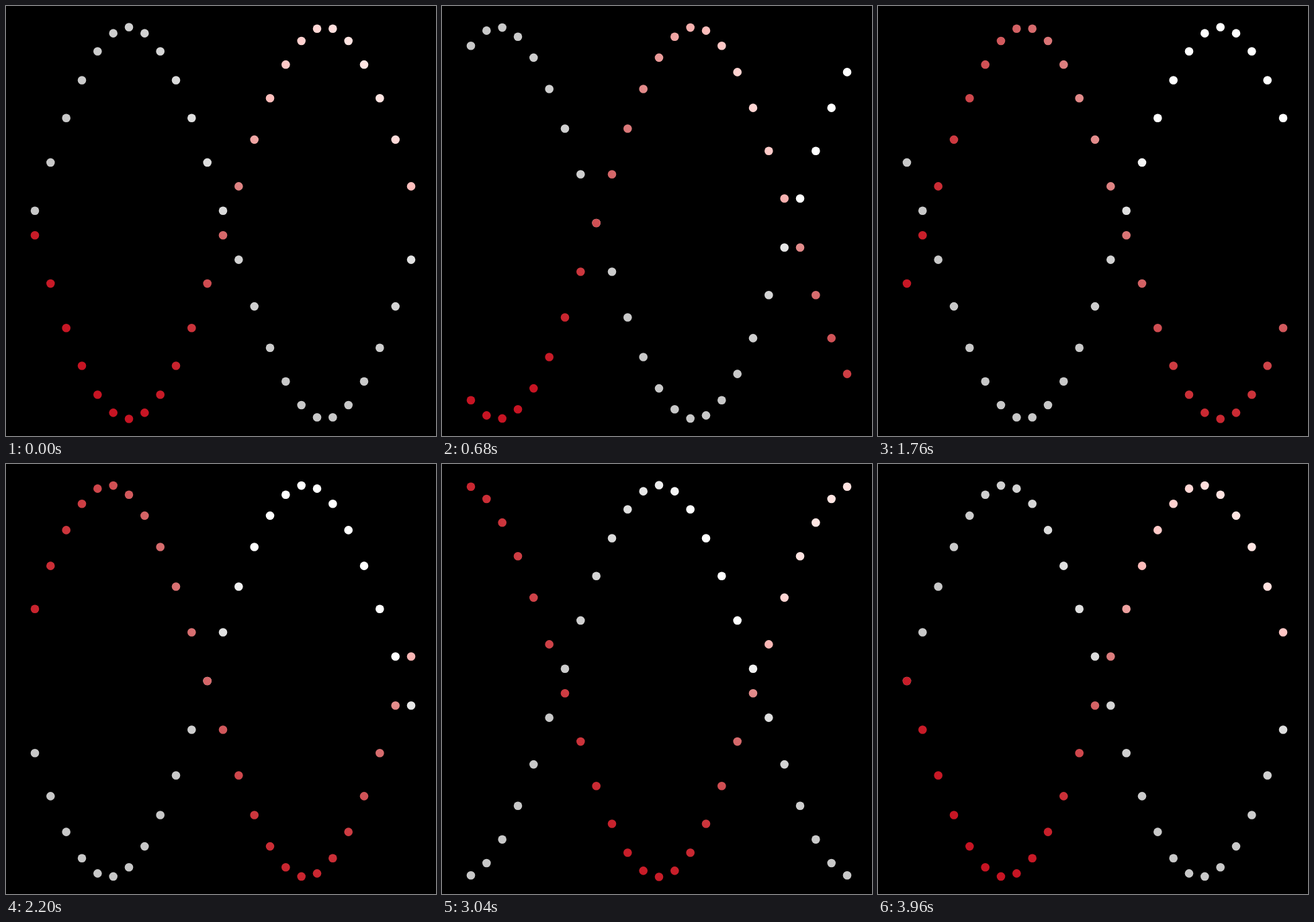
An HTML page with a canvas that plays this animation: 640 px wide and 640 px high, repeating every 4 s.

```html
<!DOCTYPE html>
<html lang="en">
<head>
<meta charset="utf-8">
<title>Double helix</title>
<style>
  html, body { margin: 0; width: 100%; height: 100%; overflow: hidden; background: #000; }
  canvas { display: block; width: 640px; height: 640px; }
</style>
</head>
<body>
<canvas id="stage" width="640" height="640"></canvas>
<script>
const ctx = document.getElementById("stage").getContext("2d");

const LOOP = 4000, STEP = 40;
const COLUMNS = 25, LEFT = 43, SPACING = 560 / 24;
const MIDDLE = 323, AMPLITUDE = 291.5, RADIUS = 6.3;
const LIGHT = { x: 570, y: 90, reach: 640 };

// Strand colour by distance from the light in the upper right corner.
function litColour(stops) {
  const gradient = ctx.createRadialGradient(LIGHT.x, LIGHT.y, 0, LIGHT.x, LIGHT.y, LIGHT.reach);
  for (const [distance, colour] of stops) {
    gradient.addColorStop(distance / LIGHT.reach, `rgb(${colour})`);
  }
  return gradient;
}

const white = litColour([
  [0, "255,255,255"], [200, "255,255,255"], [250, "238,238,238"],
  [295, "224,224,224"], [360, "211,211,211"], [480, "201,201,201"], [640, "200,200,200"]
]);
const red = litColour([
  [0, "255,230,227"], [90, "255,226,224"], [180, "255,192,190"], [230, "240,165,163"],
  [290, "221,128,128"], [380, "210,93,96"], [480, "204,53,60"],
  [560, "200,31,42"], [640, "199,20,35"]
]);

function drawStrand(colour, turn, side) {
  ctx.fillStyle = colour;
  for (let i = 0; i < COLUMNS; i++) {
    const angle = 2 * Math.PI * ((i - 6) / COLUMNS + turn);
    const y = MIDDLE - side * AMPLITUDE * Math.cos(angle);
    ctx.beginPath();
    ctx.arc(LEFT + i * SPACING, y, RADIUS, 0, 2 * Math.PI);
    ctx.fill();
  }
}

function draw(now) {
  const turn = Math.floor((now % LOOP) / STEP) * STEP / LOOP;
  ctx.fillStyle = "#000";
  ctx.fillRect(0, 0, 640, 640);
  drawStrand(white, turn, 1);
  drawStrand(red, turn, -1);
}

let start;
function tick(now) {
  start ??= now;
  draw(now - start);
  requestAnimationFrame(tick);
}
draw(0);
requestAnimationFrame(tick);
</script>
</body>
</html>
```
